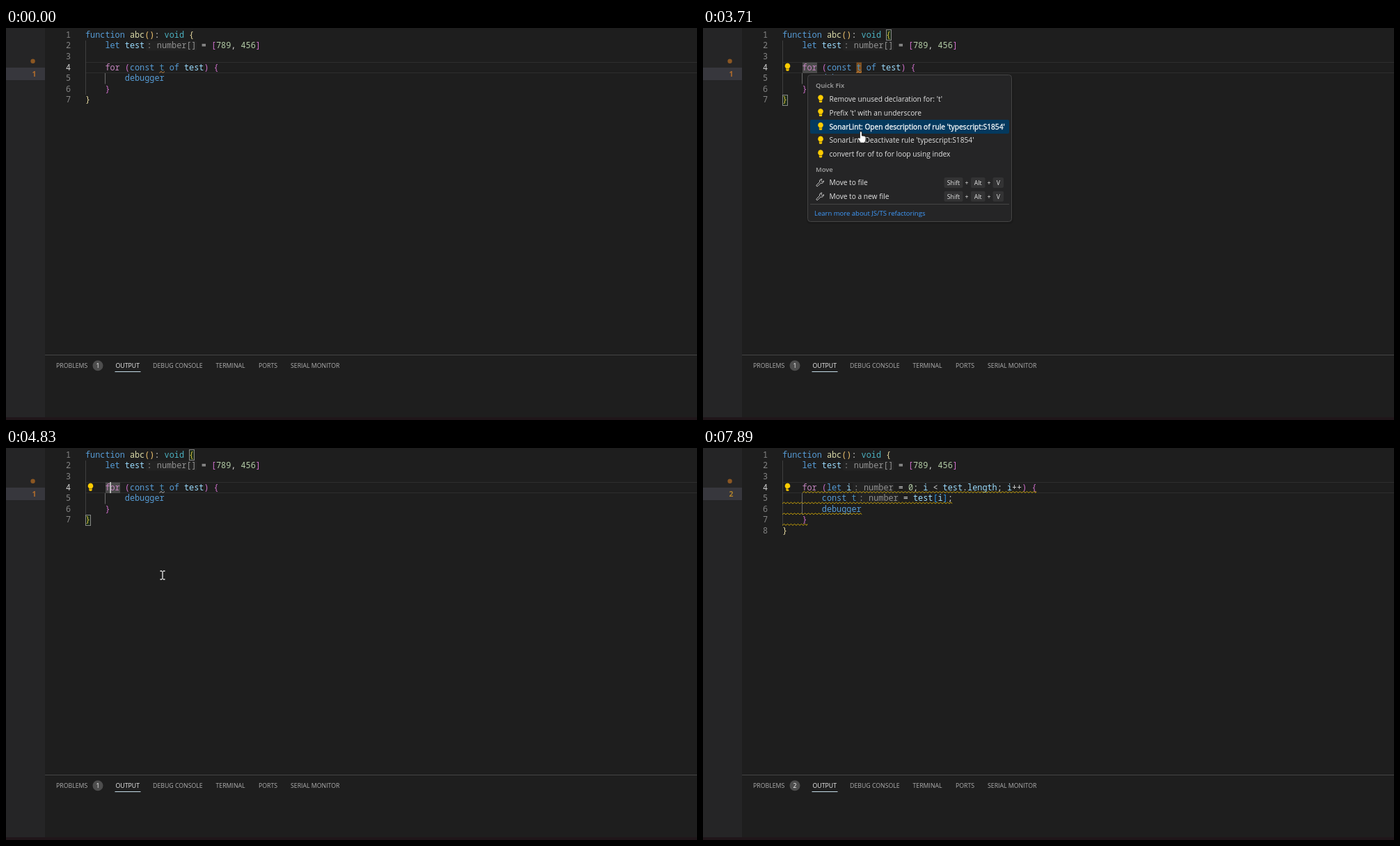
Animation, 993 px wide and 564 px high, one loop 9.01 s. Source, as an HTML page:

```html
<!DOCTYPE html>
<html lang="en">
<head>
<meta charset="utf-8">
<title>Quick fix: for-of to indexed loop</title>
<style>
  html, body { margin: 0; width: 100%; height: 100%; overflow: hidden; background: #1e1e1e; }
  svg { display: block; width: 993px; height: 564px; }
  text { font-family: "Open Sans", "Noto Sans", sans-serif; }
  .mono text { font: 11.83px "Noto Sans Mono", "DejaVu Sans Mono", monospace; }
  .tabs text { font-size: 8.75px; fill: #b0b0b0; }
  #menu text { font-size: 10.2px; fill: #e4e4e4; }
  #menu .head { font-size: 9.4px; font-weight: 600; fill: #a4a4a4; }
  #menu .key { font-size: 8.7px; text-anchor: middle; }
  #menu .link { font-size: 9.5px; fill: #3f9cff; }
  #menu .on { fill: #ffffff; stroke: #ffffff; stroke-width: .3px; }
</style>
</head>
<body>
<svg id="stage" viewBox="0 0 993 564">
  <defs>
    <g id="bulbIcon" fill="#ffcc00" transform="scale(.94)">
      <path d="M0-5.8A4.3 4.3 0 0 1 2.3 2V4.8Q2.3 6 1.2 6H-1.2Q-2.3 6-2.3 4.8V2A4.3 4.3 0 0 1 0-5.8Z"/>
      <path d="M-2.3 3H2.3" stroke="#5a4a10" stroke-width=".8"/>
    </g>
    <path id="wrenchIcon" d="M5-2.6A3.2 3.2 0 0 1 .7.7L-3.6 5A1.1 1.1 0 0 1-5.2 3.4L-.9-1A3.2 3.2 0 0 1 2.5-5.1L1-3.2 3-1.2Z"
      fill="none" stroke="#cccccc" stroke-width="1"/>
  </defs>

  <rect width="993" height="564" fill="#1e1e1e"/>
  <rect width="56" height="564" fill="#252526"/>
  <rect y="57" width="56" height="18" fill="#37373d"/>
  <circle cx="38.6" cy="47.8" r="3.2" fill="#8c5722"/>
  <text id="sideCount" x="40.5" y="70" font-size="10.4" font-weight="700" text-anchor="middle">1</text>

  <rect x="114.5" y="49.5" width="885" height="15" fill="none" stroke="#2e2e2e"/>
  <rect id="word" x="143" y="49.5" width="21" height="15.5" fill="#4a4a4a"/>
  <rect id="mark" x="220.5" y="49.5" width="7.5" height="15.5" fill="#80501f"/>
  <g id="brackets" fill="#1b2b1a" stroke="#888888">
    <rect x="263.5" y="2.5" width="7" height="15"/>
    <rect id="closing" x="114.5" y="96.5" width="7" height="15"/>
  </g>
  <g id="code" class="mono"></g>
  <use id="bulb" href="#bulbIcon" x="121.5" y="56"/>
  <circle id="notch" cx="123.8" cy="58.8" r="1.5" fill="#1e1e1e"/>
  <rect id="caret" x="149.3" y="49" width="1.7" height="16" fill="#c8c8c8"/>

  <path d="M56 470.5H993" stroke="#444444"/>
  <g id="tabs" class="tabs"></g>
  <path d="M156.5 494.5H193.5" stroke="#c5dbe8"/>
  <circle cx="132" cy="485.7" r="7.5" fill="#4d4d4d"/>
  <text id="badge" x="132" y="489" font-size="8.7" text-anchor="middle" fill="#ffffff">1</text>
  <rect y="560" width="993" height="4" fill="#20161a"/>

  <g id="menu"></g>
  <circle id="click" r="10.2" fill="#d8cc14" opacity=".75"/>
  <path id="beam" d="M-3.5-6H-.9M.9-6H3.5M0-6V6M-3.5 6H-.9M.9 6H3.5" fill="none" stroke="#f0f0f0" stroke-width="1.3"/>
  <path id="hand" d="M-1.6 9.5V1.2a1.5 1.5 0 0 1 3 0V6Q5 5.6 7 7.6V11Q7 13.6 5 16.3H-.5Q-2 13.2-4.6 10.6-4.6 8-1.6 9.5Z"
    fill="#ffffff" stroke="#111111" stroke-width=".8"/>
</svg>
<script>
const LOOP = 9010, LEFT = 114, COL = 7.1, ROW = 15.6, HINT_GAP = 3.4;
const $ = id => document.getElementById(id);
const show = (id, on) => $(id).style.display = on ? '' : 'none';
const within = (t, ...spans) => spans.some(([a, b]) => t >= a && t < b);

const colors = {
  k: '#569cd6', f: '#dcdcaa', y: '#4bb0c0', v: '#9cdcfe', u: '#4a8fbd', n: '#b5cea8',
  c: '#c586c0', p: '#d4d4d4', g: '#efc26e', w: '#e6d9a0', o: '#d070cc', b: '#2f9bf0', h: '#929292'
};
const MATCHED = '#cdba3e';

// A line is a list of tokens, each prefixed by its colour key; leading spaces advance columns.
function codeLine(tokens, row, matched) {
  let x = LEFT, out = '';
  const y = 13.8 + ROW * row;
  for (const token of tokens) {
    const key = token[0], raw = token.slice(1), text = raw.trimStart();
    x += (raw.length - text.length) * COL;
    if (key === 'h') {
      x += HINT_GAP;
      out += `<rect x="${x - 1.5}" y="${y - 11}" width="${text.length * COL + 2}" height="14" rx="2" fill="#232323"/>`;
    }
    const fill = key === 'w' && matched ? MATCHED : colors[key];
    out += `<text x="${x}" y="${y}" fill="${fill}">${text.replace(/</g, '&lt;')}</text>`;
    x += text.length * COL;
  }
  return out;
}

function squiggle(x0, x1, y, color) {
  let d = `M${x0} ${y + 1}`;
  for (let x = x0, i = 0; x < x1; i++) {
    x = Math.min(x + 2.5, x1);
    d += `L${x.toFixed(1)} ${i % 2 ? y + 1 : y - 1}`;
  }
  return `<path d="${d}" fill="none" stroke="${color}"/>`;
}

const guide = (x, y0, y1, bright) =>
  `<path d="M${x} ${y0}V${y1}" stroke="${bright ? '#6c6c6c' : '#404040'}"/>`;

const opening = [
  ['kfunction', 'f abc', 'g()', 'p:', 'y void', 'w {'],
  ['k    let', 'v test', 'h: number[]', 'p =', 'o [', 'n789', 'p,', 'n 456', 'o]'],
  []
];
const closing = [['k        debugger'], ['o    }'], ['w}']];

const versions = {
  before: {
    lines: [...opening,
      ['c    for', 'o (', 'kconst', 'u t', 'k of', 'v test', 'o)', 'o {'],
      ...closing],
    guides: [[114.5, 18, 96, false], [142.5, 65, 80.5, true]],
    warnings: []
  },
  raw: {
    lines: [...opening,
      ['c    for', 'o (', 'klet', 'v i', 'h: number', 'p=', 'n0', 'p;', 'vi', 'p<', 'v test', 'p.', 'vlength', 'p;', 'vi', 'p++', 'o)', 'o{'],
      ['kconst', 'u  t', 'h: number', 'p=', 'vtest', 'b[', 'vi', 'b]', 'p;'],
      ...closing],
    guides: [[114.5, 18, 112, true], [142.5, 81, 96, false]],
    warnings: [[143, 437], [114, 295], [114, 228], [114, 150]]
  },
  formatted: {
    lines: [...opening,
      ['c    for', 'o (', 'klet', 'v i', 'h: number', 'p =', 'n 0', 'p;', 'v i', 'p <', 'v test', 'p.', 'vlength', 'p;', 'v i', 'p++', 'o)', 'o {'],
      ['k        const', 'u t', 'h: number', 'p =', 'v test', 'b[', 'vi', 'b]', 'p;'],
      ...closing],
    guides: [[114.5, 18, 112, false], [142.5, 65, 96, true]],
    warnings: [[143, 479], [114, 358], [114, 228], [114, 150]]
  }
};

function renderCode(name, warned, tColor, matched) {
  const { lines, guides, warnings } = versions[name];
  let out = guides.map(g => guide(...g)).join('');
  lines.forEach((tokens, i) => {
    const fill = i === 3 ? '#d0d0d0' : '#858585';
    out += `<text x="93" y="${13.8 + ROW * i}" text-anchor="end" fill="${fill}">${i + 1}</text>`;
    out += codeLine(tokens, i, matched);
  });
  if (warned) warnings.forEach(([a, b], i) => out += squiggle(a, b, 63.5 + ROW * i, '#c49f08'));
  if (tColor) out += squiggle(220.5, 228, 63.5, tColor);
  $('code').innerHTML = out;
}

const tabs = { PROBLEMS: 72, OUTPUT: 157.5, 'DEBUG CONSOLE': 211, TERMINAL: 301.5, PORTS: 363, 'SERIAL MONITOR': 409 };
$('tabs').innerHTML = Object.entries(tabs).map(([name, x]) =>
  `<text x="${x}" y="489"${name === 'OUTPUT' ? ' style="fill:#f4f4f4"' : ''}>${name}</text>`).join('');

const fixes = [
  "Remove unused declaration for: 't'",
  "Prefix 't' with an underscore",
  "SonarLint: Open description of rule 'typescript:S1854'",
  "SonarLint: Deactivate rule 'typescript:S1854'",
  'convert for of to for loop using index'
];
const ITEM = 19.8, FIRST = 92.3;

function buildMenu() {
  const key = (label, x, w, y) =>
    `<rect x="${x}" y="${y - 7.5}" width="${w}" height="15" rx="2" fill="#333334"/>
     <text class="key" x="${x + w / 2}" y="${y + 3.2}">${label}</text>`;
  const move = (label, y) =>
    `<use href="#wrenchIcon" x="168.5" y="${y}"/><text x="181.5" y="${y + 3.7}">${label}</text>` +
    key('Shift', 346.5, 27, y) + key('Alt', 385, 20.5, y) + key('V', 416.5, 15.5, y) +
    [379, 411].map(x => `<text class="key" x="${x}" y="${y + 3.2}">+</text>`).join('');
  $('menu').innerHTML =
    `<rect x="149" y="68" width="297" height="214" rx="5" fill="#000" opacity=".12"/>
     <rect x="150.5" y="67.5" width="293" height="211" rx="4" fill="#252526" stroke="#454545"/>
     <rect id="hover" x="154" width="286" height="20" rx="2" fill="#04395e"/>
     <text class="head" x="162" y="85.6">Quick Fix</text>` +
    fixes.map((label, i) => {
      const y = FIRST + ITEM * (i + .5);
      return `<use href="#bulbIcon" x="169" y="${y - .6}"/><text class="fix" x="181.5" y="${y + 3.7}">${label}</text>`;
    }).join('') +
    `<text class="head" x="162" y="207.4">Move</text>` +
    move('Move to file', 222.5) + move('Move to a new file', 242.3) +
    `<path d="M154 253.5H440" stroke="#454545"/>
     <text class="link" x="160" y="270">Learn more about JS/TS refactorings</text>`;
}
buildMenu();
const fixLabels = [...document.querySelectorAll('.fix')];

// Pointer moves: start, end, visible steps, easing, points spread evenly over the time.
const smooth = p => p * p * (3 - 2 * p), linear = p => p;
const moves = [
  [120, 730, 10, smooth, [[883, 522], [175, 54]]],
  [930, 1060, 3, linear, [[170, 55], [151, 56.6]]],
  [3580, 3840, 5, linear, [[176, 64], [206, 112], [227, 149], [237, 172], [240, 183]]],
  [4110, 4440, 6, linear, [[239, 180], [236, 172], [235, 169], [232, 172], [228, 176], [225, 179]]],
  [4760, 4830, 2, linear, [[225, 181], [225, 183]]],
  [5030, 5490, 8, smooth, [[226, 185], [248, 203], [243, 210]]],
  [6610, 7020, 7, smooth, [[250, 218], [834, 557]]]
];

function pointerAt(t) {
  const move = moves.findLast(m => t >= m[0]);
  if (!move) return null;
  const [start, end, steps, ease, points] = move;
  const step = Math.min(steps - 1, Math.floor((t - start) / (end - start) * (steps - 1) + .1));
  const at = ease(step / (steps - 1)) * (points.length - 1);
  const i = Math.min(points.length - 2, Math.floor(at)), f = at - i;
  return points[i].map((a, axis) => a + (points[i + 1][axis] - a) * f);
}

let drawn = '';
function draw(t) {
  const version = t < 4900 ? 'before' : t < 6220 ? 'raw' : 'formatted';
  const tColor = t < 4760 ? '#c98a45' : t < 4900 ? '#b8b8b8' : '';
  const matched = within(t, [1060, 7890]);
  const state = [version, t >= 4960, tColor, matched];
  if (drawn !== state.join()) {
    drawn = state.join();
    renderCode(...state);
  }

  const menuOpen = within(t, [3120, 4760]);
  show('menu', menuOpen);
  show('mark', menuOpen);
  show('bulb', t >= 3120);
  show('notch', t >= 5160);
  show('word', within(t, [1460, 2660], [2920, 7890]));
  show('brackets', matched);
  $('closing').setAttribute('y', version === 'before' ? 96.5 : 112.5);
  show('caret', within(t, [1060, 1590], [2130, 3120], [4760, 5290], [5820, 6820], [7350, 7890]));

  $('badge').textContent = t < 4960 ? 1 : 2;
  $('sideCount').textContent = t < 5030 ? 1 : 2;
  $('sideCount').setAttribute('fill', t < 5030 ? '#b06c2c' : '#b0822c');

  const spot = pointerAt(t);
  const visible = within(t, [120, 3120], [3580, 7020]);
  show('hand', visible && menuOpen);
  show('beam', visible && !menuOpen);
  show('click', within(t, [1060, 1260], [2590, 2790], [4570, 4760]));
  if (spot) for (const id of ['hand', 'beam', 'click']) $(id).setAttribute('transform', `translate(${spot})`);

  if (menuOpen) {
    const row = t < 3580 ? 0 : Math.max(0, Math.min(4, Math.floor((spot[1] - FIRST) / ITEM)));
    $('hover').setAttribute('y', Math.round(FIRST + ITEM * row));
    fixLabels.forEach((label, i) => label.classList.toggle('on', i === row));
  }
}

const begin = performance.now();
function tick() {
  draw((performance.now() - begin) % LOOP);
  requestAnimationFrame(tick);
}
tick();
</script>
</body>
</html>
```
